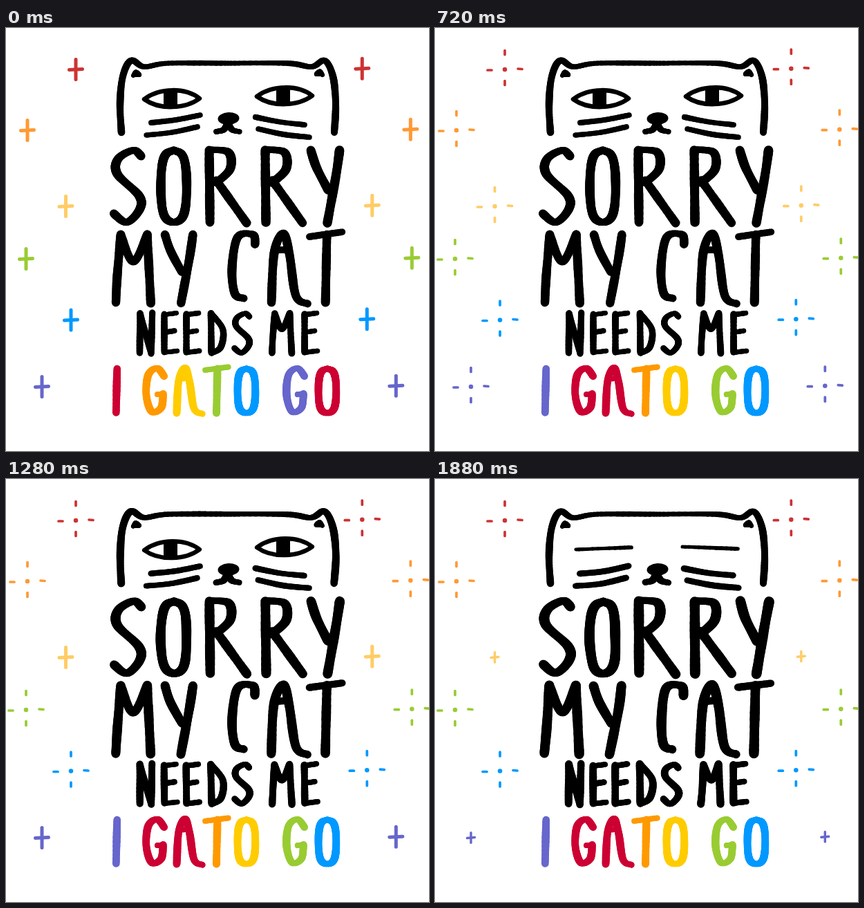
Write an HTML page with a canvas that moves like this. It is 612 px wide and 612 px high and loops after 1.92 s.

```html
<!DOCTYPE html>
<html lang="en">
<head>
<meta charset="utf-8">
<title>Sorry my cat needs me</title>
<style>
html, body { margin: 0; width: 100%; height: 100%; overflow: hidden; background: #fff }
canvas { display: block }
</style>
</head>
<body>
<canvas id="stage" width="612" height="612" role="img" aria-label="Sorry my cat needs me, I gato go"></canvas>
<script>
const ctx = document.getElementById('stage').getContext('2d');
const LOOP = 1920, SLOT = 40, INK = '#000';
const RAINBOW = ['#cc0033', '#ff9900', '#ffcc00', '#99cc33', '#0099ff', '#6666cc', '#cc0033'];

// "x,y x,y / x,y x,y": key points of brush strokes.
const parse = text => text.split('/').map(s => s.trim().split(' ').map(p => p.split(',').map(Number)));

// A tall rounded ring, 36 wide and 100 high.
const ring = Array.from({ length: 13 }, (_, i) => {
  const a = i * Math.PI / 6, round = v => Math.sign(v) * Math.abs(v) ** 0.75;
  return [18 + 18 * round(Math.sin(a)), 50 - 50 * round(Math.cos(a))];
});

// Letter skeletons, 100 units high.
const glyphs = {
  S: parse('37,8 26,0 5,12 4,33 34,63 35,82 17,100 -1,88'),
  O: [ring],
  R: parse('0,0 1,100 / 2,-1 27,3 29,26 10,45 / 10,42 52,101'),
  Y: parse('0,0 8,24 24,55 / 40,0 35,35 23,101'),
  M: parse('5,0 0,60 -2,100 / 5,1 23,40 43,0 / 43,0 48,101'),
  C: parse('33,14 30,0 8,4 0,50 4,87 17,94'),
  A: parse('0,100 4,27 17,-2 26,30 35,90 52,102 / 4,23 25,22'),
  T: parse('0,3 47,-4 / 25,0 23,100'),
  N: parse('0,0 -1,100 / 0,0 28,101 / 31,-2 28,102'),
  E: parse('0,2 0,98 / 1,3 31,-1 / 1,48 26,44 / 0,99 33,95'),
  D: parse('1,0 2,98 / 1,0 31,40 26,85 2,101'),
  G: parse('36,17 22,-1 4,14 0,60 11,97 30,88 34,57 / 22,58 34,57'),
  I: parse('1,0 -1,99')
};

const rows = [
  { text: 'SORRY', top: 177, height: 104, widen: 1, weight: 12.3, lefts: [157, 224, 294, 375, 441] },
  { text: 'MYCAT', top: 299, height: 98, widen: 1.03, weight: 11.8, lefts: [161, 230, 327, 384, 439] },
  { text: 'NEEDSME', top: 413, height: 57, widen: 1, weight: 8.8, lefts: [194, 229, 261, 296, 331, 386, 432] },
  { text: 'IGATOGO', top: 493, height: 64, widen: 1.12, weight: 10.2, lefts: [160, 203, 247, 288, 335, 406, 452], rainbow: true }
];

// The cat's left half; the right half mirrors it.
const face = {
  outline: parse('167,151 165,110 169,70 181,47 200,56 235,51 321,51'),
  ear: parse('184,69 188,63 193,68 184,69'),
  whiskers: parse('210,137 245,133 281,126 / 203,155 240,151 277,143'),
  mouth: parse('321,137 315,147 304,150'),
  lid: parse('204,102 284,99')
};
const mirror = (strokes, dy) => strokes.map(s => s.map(([x, y]) => [642 - x, y + dy]));

function segment(x1, y1, x2, y2, w) {
  ctx.lineWidth = w;
  ctx.beginPath();
  ctx.moveTo(x1, y1);
  ctx.lineTo(x2, y2);
  ctx.stroke();
}

const spline = (a, b, c, d, t) =>
  b + t * (c - a + t * (2 * a - 5 * b + 4 * c - d + t * (3 * (b - c) + d - a))) / 2;

// Each pose shifts the drawing a little, as if redrawn by hand.
const wobble = ([x, y], pose) =>
  [x + 0.4 * pose * Math.sin(y * 0.07 + pose), y + 0.3 * pose * Math.sin(x * 0.05 + pose)];

// Upright parts of a stroke are heavier than level ones.
function brush(strokes, weight, pose = 0, color = INK) {
  ctx.strokeStyle = color;
  for (const raw of strokes) {
    const p = raw.map(q => wobble(q, pose)), end = p.length - 1;
    let [x, y] = p[0];
    for (let i = 0; i < end; i++) {
      const a = p[Math.max(i - 1, 0)], b = p[i], c = p[i + 1], d = p[Math.min(i + 2, end)];
      for (let t = 1; t <= 12; t++) {
        const nx = spline(a[0], b[0], c[0], d[0], t / 12), ny = spline(a[1], b[1], c[1], d[1], t / 12);
        const upright = Math.abs(ny - y) / Math.hypot(nx - x, ny - y);
        const swell = 0.4 * Math.sin(ny * 0.12 + nx * 0.05);
        segment(x, y, nx, ny, weight * (0.76 + 0.32 * upright) + swell);
        [x, y] = [nx, ny];
      }
    }
  }
}

function write({ text, top, height, widen, weight, lefts, rainbow }, step, pose) {
  const unit = height / 100;
  [...text].forEach((letter, i) => {
    const strokes = glyphs[letter].map(s => s.map(([x, y]) => [lefts[i] + x * unit * widen, top + y * unit]));
    if (rainbow) brush(strokes, weight, 0, RAINBOW[(i + 28 - step) % 7]);
    else brush(strokes, weight + pose * 0.6, pose);
  });
}

function eye(x, y, pose) {
  const lens = new Path2D(`M${x - 40} ${y + 1}C${x - 18} ${y - 16} ${x + 20} ${y - 16} ${x + 40} ${y}` +
    `C${x + 20} ${y + 15} ${x - 18} ${y + 17} ${x - 40} ${y + 1}Z`);
  ctx.lineWidth = 6.5 - pose * 0.3;
  ctx.strokeStyle = INK;
  ctx.stroke(lens);
  ctx.save();
  ctx.clip(lens);
  ctx.fillRect(x - 12, y - 18, 20, 36);
  ctx.restore();
}

function cat(pose, blink) {
  const both = (strokes, weight, p, dy = 0) => {
    brush(strokes, weight, p);
    brush(mirror(strokes, dy), weight, p);
  };
  const shape = blink ? 0 : pose;
  both(face.outline, 9.5 + shape * 0.5, shape);
  both(face.ear, 6, shape, -1);
  both(face.whiskers, 9.5 + pose * 0.6, pose, 3);
  both(face.mouth, 9 + pose * 0.6, pose);
  ctx.beginPath();
  ctx.ellipse(322, 131, 15.5, 9, -0.05, 0, 7);
  ctx.fill();
  if (blink) return both(face.lid, 7, 0, -1);
  eye(240, 102, pose);
  eye(403, 98, pose);
}

const sparkles = [
  ['#cc3333', 101, 60], ['#ff9933', 31, 148], ['#ffcc66', 86.5, 258],
  ['#99cc33', 29, 334], ['#0099ff', 94, 422.5], ['#6666cc', 52, 519]
];

const plus = (h, v, w) => (x, y) => {
  segment(x - h, y + 0.5, x + h, y - 0.5, w);
  segment(x, y - v, x, y + v, w);
};

// Four rays between two distances around a central dot.
const burst = (near, far, w, dot) => (x, y) => {
  segment(x, y, x, y, dot);
  segment(x - far, y + 1, x - near, y + 1, w);
  segment(x + near, y - 1, x + far, y - 0.5, w);
  segment(x, y - 2.5 - far, x, y - 2.5 - near, w);
  segment(x, y - 2.5 + near, x, y - 2.5 + far, w);
};

const stages = [
  plus(9.5, 14.5, 5), burst(10, 21, 4, 8), burst(19, 25, 3.7, 6.5), burst(27, 27.5, 2, 2.5),
  () => {}, plus(2.7, 3.7, 2.4), plus(5.5, 7.2, 3.4)
];

function draw(slot) {
  const step = slot >> 1, pose = step % 3;
  ctx.fillStyle = '#fff';
  ctx.fillRect(0, 0, 612, 612);
  ctx.fillStyle = INK;
  ctx.lineCap = ctx.lineJoin = 'round';

  cat(pose, step >= 22);
  rows.forEach(row => write(row, step, pose));

  // Every third sparkle runs faster and rests one slot longer while hidden.
  const beat = slot % 8, quick = beat > 4 ? beat - 1 : beat;
  sparkles.forEach(([color, x, y], i) => {
    const stage = stages[i % 3 === 2 ? quick : step % 7];
    ctx.strokeStyle = color;
    stage(x, y);
    stage(616.3 - x, y - 1.3);
  });
}

let shown = -1;
const start = performance.now();
function tick() {
  const slot = Math.floor((performance.now() - start) % LOOP / SLOT);
  if (slot !== shown) draw(shown = slot);
  requestAnimationFrame(tick);
}
tick();
</script>
</body>
</html>
```
